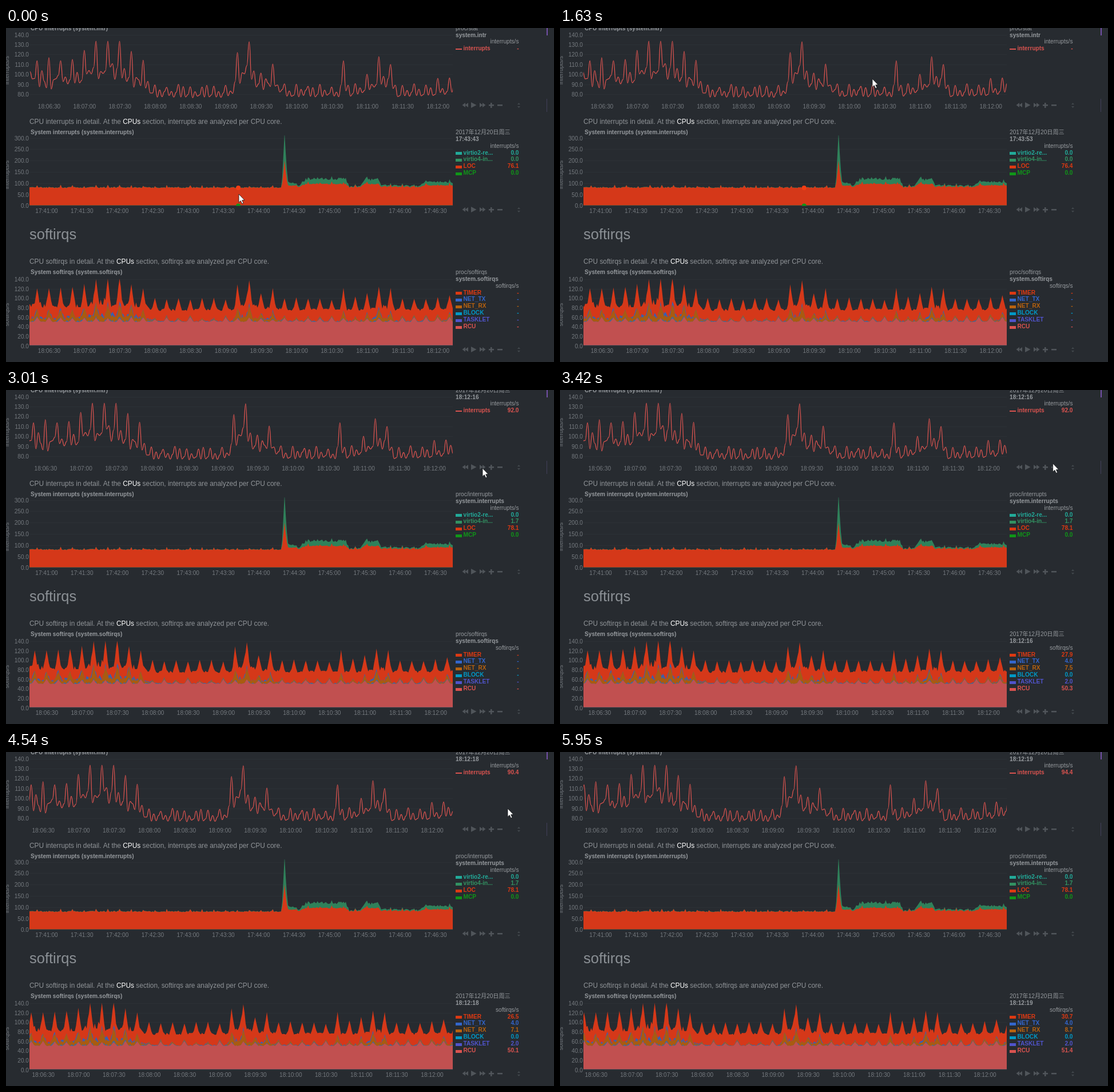
These frames come from a looping animation (958x585 px, 6050 ms). An HTML page with a canvas:

```html
<!DOCTYPE html>
<html lang="en">
<head>
<meta charset="utf-8">
<style>
  html, body { margin: 0; width: 100%; height: 100%; overflow: hidden; background: #272b30; }
  canvas { display: block; }
</style>
</head>
<body>
<canvas id="stage" width="958" height="585"></canvas>
<script>
const ctx = document.getElementById('stage').getContext('2d');
const LOOP = 6050, LEFT = 42, RIGHT = 781, SECOND = 2.06, SAMPLES = 370;
const FAMILY = '"Liberation Sans", "Noto Sans CJK SC", "Noto Sans CJK", sans-serif';
const SMALL = '10.15px ' + FAMILY, BOLD = 'bold ' + SMALL;
const MUTED = '#74797e', PALE = '#969a9e', RED = '#dc3912', LINE = '#d9534f';

// Pointer poses: ms, x, y. Between them it moves in hard steps.
const pointerPath = [
  [0, 407, 291], [420, 407, 291], [560, 368, 291], [950, 315, 291], [1210, 439, 328],
  [1630, 546, 89], [2290, 677, 177], [2710, 677, 177], [2850, 690, 169], [3010, 833, 137],
  [3270, 858, 136], [3540, 865, 122], [3830, 877, 99], [4830, 877, 99], [5370, 911, 573]
];
const POINTER_STEP = 140, POINTER_GONE = 5520;

const lineScrolls = [1360, 2020, 3010, 3680, 4540, 5520];
const stackScrolls = [1360, 2020, 3150, 3680, 4540, 5950];
const lineValues = ['92.0', '96.9', '90.4', '94.4'];
const timerValues = ['27.9', '29.5', '26.5', '30.7'];
const rxValues = ['7.5', '7.9', '7.1', '8.7'];
const rcuValues = ['50.3', '49.1', '50.1', '51.4'];

// Server load and disk activity (0 to 1) over the seconds of the visible window.
const loadKeys = [[0, .5], [40, .55], [56, .9], [76, .9], [96, .5], [105, .02], [171, .02],
  [176, .65], [186, .85], [196, .25], [206, .45], [216, .05], [262, .02], [266, .5], [270, .02],
  [282, .15], [296, .55], [306, .45], [310, .05], [336, .05], [362, .25], [SAMPLES, .25]];
const diskKeys = [[0, 0], [214, 0], [218, .7], [228, .2], [234, .9], [268, .9], [271, .1],
  [280, .1], [284, .9], [295, .9], [298, .25], [330, .15], [336, .6], [352, .6], [SAMPLES, .2]];

const countAt = (times, t) => times.filter(s => s <= t).length;
const noise = n => { const s = Math.sin(n * 127.1 + 7) * 43758.5; return s - Math.floor(s); };
const clock = s => [s / 3600, s / 60 % 60, s % 60]
  .map(v => String(Math.floor(v)).padStart(2, '0')).join(':');
const mix = (a, b, p) => a + (b - a) * p;
function keyed(keys, at) {
  const i = Math.max(1, keys.findIndex(k => k[0] >= at));
  const [a, b] = [keys[i - 1], keys[i]];
  return mix(a[1], b[1], (at - a[0]) / (b[0] - a[0]));
}
const load = i => keyed(loadKeys, i);
const disk = i => keyed(diskKeys, i);
const series = fn => Array.from({ length: SAMPLES }, (_, i) => fn(i));
const xOf = i => LEFT + i * SECOND;
// Seconds since the last pulse; one pulse arrives every ten seconds.
const phase = i => (i + 4) % 10;

function interruptY(i) {
  const l = load(i), p = phase(i);
  if (p === 0) return 103 - 92 * l + 7 * (noise(i) - .5);
  const low = 123 - 4 * noise(i) - l * (25 + 38 * noise(i + 50));
  return p === 4 ? low - 8 - 10 * noise(i + 9) : p === 8 ? low - 9 * noise(i + 9) : low;
}
const interruptLine = series(i => [xOf(i), interruptY(i)]).filter((_, i) => i % 2 === 0);

const redTops = [], greenTops = [];
for (let i = 0; i < SAMPLES; i++) {
  const d = disk(i), surge = Math.max(0, 1 - Math.abs(i - 216) / 2.5);
  const bump = phase(i) === 0 ? 2 + 2 * noise(i) : 0;
  const red = 280.5 - 7 * d - bump - 42 * surge - noise(i) * 2;
  redTops.push([xOf(i), red]);
  greenTops.push([xOf(i), red - .3 - d * (7 + 5 * noise(i + 500)) - 46 * surge]);
}

const softirqs = series(i => {
  const l = load(i), p = phase(i), k = Math.floor((i + 9) / 10);
  const pulse = Math.max(0, 1 - Math.min(p, 10 - p) / 2.6);
  const peak = 475 - 40 * l + 4 * (noise(k) - .5);
  const base = 494 - 7 * l - l * 20 * noise(i) * noise(i + 60) + 4 * (noise(i + 400) - .5);
  const rcu = 515 - pulse * (3 + 6 * noise(k)) - noise(i + 90);
  const tasklet = rcu - (noise(i + 200) > .7 ? 1 + 2 * l : 0);
  const rx = tasklet - l * (7 + 5 * noise(i + 800)) - pulse * (2 + 13 * l);
  const tx = rx - (noise(i + 1200) > .6 ? .8 + 5 * l : 0);
  return { timer: mix(base, peak, pulse), tx, rx, tasklet, rcu };
});

function text(str, x, y, color, font = SMALL, align = 'left') {
  ctx.font = font; ctx.fillStyle = color; ctx.textAlign = align;
  ctx.fillText(str, x, y);
  return ctx.measureText(str).width;
}
function polygon(points, color) {
  ctx.fillStyle = color;
  ctx.beginPath();
  points.forEach(p => ctx.lineTo(...p));
  ctx.closePath();
  ctx.fill();
}
function plotArea(top, bottom, draw) {
  ctx.save();
  ctx.beginPath();
  ctx.rect(LEFT - 1, top, RIGHT - LEFT + 1, bottom - top);
  ctx.clip();
  draw();
  ctx.restore();
}
const area = (points, bottom, color) => polygon(
  [[LEFT - 1, bottom], [LEFT - 1, points[0][1]], ...points, [points.at(-1)[0], bottom]], color);

function yAxis(max, step, count, top, pitch, unit, middle) {
  for (let i = 0; i < count; i++) {
    const y = top + i * pitch;
    ctx.fillStyle = '#2c3136';
    ctx.fillRect(LEFT, Math.round(y), RIGHT - LEFT, 1);
    text((max - i * step).toFixed(1), 40, y + 4, MUTED, SMALL, 'right');
  }
  ctx.save();
  ctx.translate(5, middle);
  ctx.rotate(-Math.PI / 2);
  text(unit, 0, 0, MUTED, SMALL, 'center');
  ctx.restore();
}
function xAxis(x, y, start) {
  for (let i = 0; i < 12; i++) text(clock(start + i * 30), x + i * 30 * SECOND, y, MUTED, SMALL, 'center');
}
function toolbox(y) {
  const color = '#50555a';
  const triangle = (x, w, h) => polygon([[x, y - h], [x + w, y], [x, y + h]], color);
  triangle(803, -5.5, 4); triangle(808, -5.5, 4);
  triangle(813, 9.5, 5);
  triangle(828, 5.5, 4); triangle(833, 5.5, 4);
  ctx.fillStyle = color;
  ctx.fillRect(844, y - 1, 9, 2.5); ctx.fillRect(847, y - 4, 2.5, 9);
  ctx.fillRect(859, y - 1, 9, 2.5);
  polygon([[894, y - 1], [896.5, y - 4], [899, y - 1]], '#43484d');
  polygon([[894, y + 2], [896.5, y + 5], [899, y + 2]], '#43484d');
}
function legend(y, plugin, context, unit, time, rows, thin) {
  text(time ? '2017年12月20日周三' : plugin, 786, y, PALE);
  text(time || context, 786, y + 12, PALE, BOLD);
  text(unit, 896.5, y + 23.5, PALE, SMALL, 'right');
  rows.forEach(([name, color, value], i) => {
    const base = y + 35.5 + i * 11.9;
    ctx.fillStyle = color;
    ctx.fillRect(786, Math.round(base - (thin ? 3 : 4.5)), 11, thin ? 2 : 5);
    text(name, 799.5, base, color, BOLD);
    text(value, 896.5, base, color, BOLD, 'right');
  });
}
function paragraph(subject, y) {
  const font = '11.9px ' + FAMILY;
  let x = 41;
  [[`CPU ${subject} in detail. At the `, '#8f9397'], ['CPUs', '#fff'],
    [` section, ${subject} are analyzed per CPU core.`, '#8f9397']]
    .forEach(([part, color]) => { x += text(part, x, y, color, font); });
}

function pointerAt(t) {
  const i = pointerPath.findLastIndex(p => p[0] <= t);
  const a = pointerPath[i], b = pointerPath[i + 1] || a;
  const held = Math.floor((t - a[0]) / POINTER_STEP) * POINTER_STEP;
  const p = held / (b[0] - a[0] || 1);
  return [mix(a[1], b[1], p), mix(a[2], b[2], p)];
}

function drawLineChart(t) {
  const scroll = countAt(lineScrolls, t), offset = -scroll * SECOND;
  text('CPU interrupts (system.intr)', 43, 3.5, PALE, BOLD);
  yAxis(140, 10, 7, 11.5, 17.45, 'interrupts/s', 74);
  plotArea(0, 130, () => {
    ctx.strokeStyle = LINE; ctx.lineWidth = 1.3;
    ctx.beginPath();
    interruptLine.forEach(([x, y], i) => {
      const [px, py] = interruptLine[Math.max(0, i - 1)], mid = (px + x) / 2 + offset;
      if (i) ctx.bezierCurveTo(mid, py, mid, y, x + offset, y);
      else ctx.moveTo(x + offset, y);
    });
    ctx.stroke();
  });
  xAxis(75.5 + offset, 141, 65190);
  const live = scroll >= 3;
  legend(3.5, 'proc/stat', 'system.intr', 'interrupts/s', live && clock(65533 + scroll),
    [['interrupts', LINE, live ? lineValues[scroll - 3] : '-']], true);
  toolbox(135);
}

function hoverAt(t) {
  if (t < 1210) return { second: Math.round((pointerAt(t)[0] - LEFT) / SECOND), loc: t < 560 ? '76.1' : '80.5' };
  if (t < 1510) return { second: null, loc: '80.5' };
  if (t < 1780) return { second: 187, loc: '76.4' };
  return { second: null, loc: '78.1' };
}

function drawInterruptsChart(t) {
  const { second, loc } = hoverAt(t);
  text('System interrupts (system.interrupts)', 43, 186, PALE, BOLD);
  yAxis(300, 50, 7, 192.5, 19.8, 'interrupts/s', 257);
  plotArea(188, 310.5, () => {
    area(greenTops, 311, '#2f815a');
    area(redTops, 311, '#d53819');
  });
  if (second !== null) {
    const x = xOf(second) - .5;
    ctx.fillStyle = '#f23d14';
    ctx.beginPath(); ctx.arc(x, 280, 4, 0, 7); ctx.fill();
    ctx.fillStyle = '#109618';
    ctx.beginPath(); ctx.arc(x, 311.5, 4, Math.PI, 0); ctx.fill();
  }
  xAxis(71, 324, 63660);
  legend(186, 'proc/interrupts', 'system.interrupts', 'interrupts/s',
    second !== null && clock(63646 + second), [
      ['virtio2-re...', '#22aa99', '0.0'], ['virtio4-in...', '#329262', t < 1780 ? '0.0' : '1.7'],
      ['LOC', RED, loc], ['MCP', '#109618', '0.0']]);
  toolbox(318);
}

function drawSoftirqsChart(t) {
  const scroll = countAt(stackScrolls, t), offset = -scroll * SECOND;
  text('System softirqs (system.softirqs)', 43, 431, PALE, BOLD);
  yAxis(140, 20, 8, 440, 16.65, 'softirqs/s', 502);
  const layer = (key, color) =>
    area(softirqs.map((tops, i) => [xOf(i) + offset, tops[key]]), 556, color);
  plotArea(434, 555.5, () => {
    layer('timer', '#d53819');
    layer('tx', '#3560b5');
    layer('rx', '#a95b10');
    layer('tasklet', '#376b9f');
    layer('rcu', '#c15050');
  });
  xAxis(75.5 + offset, 569, 65190);
  const live = scroll >= 3, n = scroll - 3;
  const rows = [['TIMER', RED, timerValues[n]], ['NET_TX', '#3366cc', '4.0'],
    ['NET_RX', '#b8620f', rxValues[n]], ['BLOCK', '#0099c6', '0.0'],
    ['TASKLET', '#5054cc', '2.0'], ['RCU', LINE, rcuValues[n]]];
  legend(431, 'proc/softirqs', 'system.softirqs', 'softirqs/s', live && clock(65533 + scroll),
    rows.map(([name, color, value]) => [name, color, live ? value : '-']));
  toolbox(563);
}

function drawPointer(t) {
  if (t >= POINTER_GONE) return;
  ctx.save();
  ctx.translate(...pointerAt(t));
  polygon([[0, 0], [0, 14.5], [3.3, 11.6], [5.7, 16.8], [8, 15.8], [5.7, 10.7], [10, 10.5]], '#fff');
  ctx.strokeStyle = '#15171a'; ctx.lineWidth = .8;
  ctx.stroke();
  ctx.restore();
}

function frame(now) {
  const t = now % LOOP;
  ctx.fillStyle = '#272b30';
  ctx.fillRect(0, 0, 958, 585);
  ctx.fillStyle = '#7350a8';
  ctx.fillRect(945, 0, 2, 13);
  ctx.fillStyle = '#413f59';
  ctx.fillRect(945, 124, 1, 23);
  drawLineChart(t);
  paragraph('interrupts', 168);
  drawInterruptsChart(t);
  text('softirqs', 41, 370, '#8b9095', '25.5px ' + FAMILY);
  paragraph('softirqs', 413);
  drawSoftirqsChart(t);
  drawPointer(t);
  requestAnimationFrame(frame);
}
requestAnimationFrame(frame);
</script>
</body>
</html>
```
